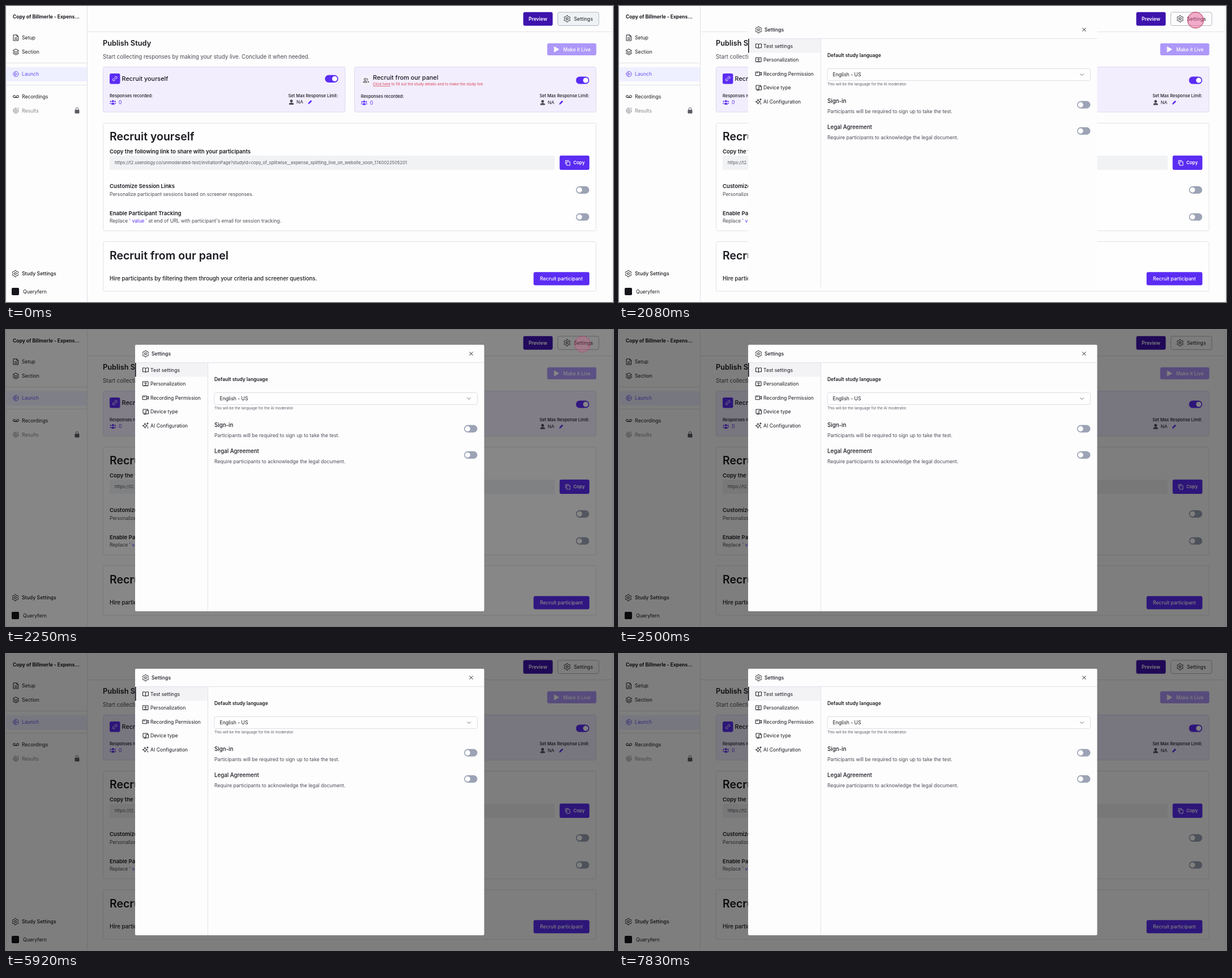
Recreate the animation shown at these times as an HTML page. Size 1072x522 px, loop 8000 ms.

```html
<!DOCTYPE html>
<html lang="en">
<head>
<meta charset="utf-8">
<title>Publish study</title>
<style>
html, body { margin: 0; width: 100%; height: 100%; overflow: hidden; background: #fdfdfd }
svg { display: block; font-family: Inter, "Open Sans", sans-serif }
.icon { fill: none; stroke-width: 1; stroke-linecap: round; stroke-linejoin: round }
</style>
</head>
<body>
<svg id="stage" width="1072" height="522" viewBox="0 0 1072 522"></svg>
<script>
const INK = '#1a1a20', GREY = '#4a4a54', VIOLET = '#5b2cf3', LINE = '#e1e2e8';

// y is the middle of the capitals
const text = (x, y, size, str, fill = INK, weight = 400) =>
  `<text x="${x}" y="${(y + size * .36).toFixed(2)}" font-size="${size}" font-weight="${weight}" fill="${fill}">${str}</text>`;
const rect = (x, y, w, h, fill, r = 0, stroke = 'none') =>
  `<rect x="${x}" y="${y}" width="${w}" height="${h}" rx="${r}" fill="${fill}" stroke="${stroke}"/>`;
const line = (d, stroke = LINE) => `<path d="${d}" fill="none" stroke="${stroke}"/>`;
const circle = (x, y, r, fill) => `<circle cx="${x}" cy="${y}" r="${r}" fill="${fill}"/>`;
const ring = r => `M${-r} 0a${r} ${r} 0 1 0 ${2 * r} 0a${r} ${r} 0 1 0 ${-2 * r} 0`;
// icon paths are drawn around their own centre
const icon = (x, y, d, color = INK, fill = 'none') =>
  `<path class="icon" transform="translate(${x} ${y})" d="${d}" stroke="${color}" style="fill:${fill}"/>`;

function gear(x, y) {
  let d = '';
  for (let i = 0; i < 48; i++) {
    const a = i * Math.PI / 24, r = 5 + .75 * Math.tanh(3 * Math.cos(6 * a));
    d += `${i ? 'L' : 'M'}${(r * Math.sin(a)).toFixed(2)} ${(r * Math.cos(a)).toFixed(2)}`;
  }
  return icon(x, y, d + 'Z' + ring(1.9));
}

const toggle = (x, y, on) =>
  rect(x - 11.7, y - 6.6, 23.4, 13.2, on ? VIOLET : '#9ca3b5', 6.6) + circle(x + (on ? 5.5 : -5.5), y, 4.6, '#fff');

const PLAY = 'M-1.4 -2.3L2.2 0L-1.4 2.3Z';
const PEOPLE = 'M-1.5 -2a1.5 1.5 0 1 0 3 0a1.5 1.5 0 1 0 -3 0M-2.5 3.2V2.2Q0 .2 2.5 2.2V3.2Z' +
  'M-4.6 -1.4a.8 .8 0 1 0 1.6 0a.8 .8 0 1 0 -1.6 0M3 -1.4a.8 .8 0 1 0 1.6 0a.8 .8 0 1 0 -1.6 0M-5 2.4V1.5H-3.8M5 2.4V1.5H3.8';
const USER = 'M-2 -2a2 2 0 1 0 4 0a2 2 0 1 0 -4 0M-3.6 3.6V2.4Q0 .4 3.6 2.4V3.6Z';
const USERS = 'M-3.6 -1.8a1.8 1.8 0 1 0 3.6 0a1.8 1.8 0 1 0 -3.6 0M-5 3.4Q-4.8 1.4 -1.8 1.4T1.4 3.4ZM1.6 -3.5a1.8 1.8 0 0 1 0 3.4M3 1.5Q4.6 2 4.8 3.4H3.4';
const LINK = 'M-1.2 1.2L1.2 -1.2M-.4 -2.2L1 -3.6A1.9 1.9 0 0 1 3.6 -1L2.2 .4M.4 2.2L-1 3.6A1.9 1.9 0 0 1 -3.6 1L-2.2 -.4';
const PENCIL = 'M-3 3L-2.4 1L1.4 -2.8L2.8 -1.4L-1 2.4Z';

function counters(x, y) {
  return text(x, y, 7.5, 'Responses recorded:', INK, 500) +
    icon(x + 5.8, y + 11.5, PEOPLE, VIOLET, VIOLET) + text(x + 16, y + 11.5, 8.7, '0', VIOLET) +
    text(x + 315.5, y - .3, 7.5, 'Set Max Response Limit:', INK, 500) +
    icon(x + 321, y + 11.2, USER, '#44444c', '#44444c') + text(x + 330, y + 10.8, 8.2, 'NA') +
    icon(x + 354, y + 11, PENCIL, VIOLET, VIOLET);
}

const sidebar =
  line('M143.5 0V522M0 100.5H143M0 139.5H143') + line('M.5 0V522M1070.5 0V522', '#ececf0') +
  text(12, 19, 8.5, 'Copy of Billmerle - Expens...', INK, 700) +
  icon(17.5, 56, 'M-4 -5H1.5L4 -2.5V5H-4ZM1.5 -5V-2.5H4M-2 0H2M-2 2.5H2') + text(28, 56, 8.7, 'Setup') +
  icon(17.5, 81, 'M0 -5L5 -2.4L0 .2L-5 -2.4ZM-5 .2L0 2.8L5 .2M-5 2.6L0 5.2L5 2.6') + text(28, 81, 8.7, 'Section') +
  rect(0, 108, 143, 25, '#eeefff') +
  icon(17.5, 120, ring(4.6) + PLAY, '#6d4df2') + text(28, 120, 8.7, 'Launch', '#6d4df2') +
  icon(17.5, 159.5, 'M-5 0a2 2 0 1 0 4 0a2 2 0 1 0 -4 0M1 0a2 2 0 1 0 4 0a2 2 0 1 0 -4 0M-3 2H3') +
  text(28, 159.5, 8.7, 'Recordings') +
  icon(17.5, 184.5, 'M4.4 -1A4.5 4.5 0 1 1 1 -4.4M2 .2A2.1 2.1 0 1 1 -.2 -2M0 0L4.6 -4.6', '#77777f') +
  text(28, 184.5, 8.7, 'Results', '#85858d') +
  rect(121.5, 183, 8, 6.5, '#5c5c64', 1) + line('M123.3 183V181.5A2.2 2.2 0 0 1 127.7 181.5V183', '#5c5c64') +
  gear(16.5, 472) + text(28, 471.5, 8.7, 'Study Settings', INK, 500) +
  rect(10, 497, 13, 13, '#16161a', 2) + text(30, 503.5, 8.7, 'Queryfern');

const header =
  line('M143 45.5H1070') +
  rect(913.5, 10.8, 52, 24, '#3e13ad', 3) + text(923, 22.5, 8.5, 'Preview', '#fff', 600) +
  `<rect id="settings" x="974.5" y="11" width="72.5" height="23.5" rx="3" stroke="#b4b8c0"/>` +
  gear(991, 22.5) + text(1003, 22.5, 8.7, 'Settings') +
  text(171, 65, 12.8, 'Publish Study', INK, 600) +
  text(171, 89.5, 9.73, 'Start collecting responses by making your study live. Conclude it when needed.', GREY) +
  rect(955.8, 65.8, 86.7, 21.2, '#ad98f9', 3) + icon(972, 76.5, 'M-3.5 -4.5L4.5 0L-3.5 4.5Z', '#fff', '#fff') +
  text(984, 76.5, 8.5, 'Make it Live', '#fff', 500);

const cards =
  rect(171.5, 107.5, 427.5, 79.5, '#f2eefe', 3, '#dcd8ef') + rect(615.5, 107.5, 426.5, 79.5, '#f2eefe', 3, '#dcd8ef') +
  rect(183, 119, 18.5, 18.5, VIOLET, 3) + icon(192.2, 128.2, LINK, '#fff') +
  text(204.5, 128.3, 10.85, 'Recruit yourself', INK, 500) + toggle(575, 128.3, true) + counters(183, 158.3) +
  rect(627, 122, 18, 18, '#f4f2f8', 3) + icon(636, 131, USERS, '#3c3c44') +
  text(648, 126, 10.85, 'Recruit from our panel', INK, 500) +
  text(648, 138, 6.52, '<tspan text-decoration="underline">Click here</tspan> to fill out the study details and to make the study live', '#dc3f4d') +
  toggle(1018.3, 131, true) + counters(626.7, 159);

const recruit =
  rect(171.5, 206.5, 870.5, 190, '#fefefe', 3, LINE) +
  text(183, 230, 19.5, 'Recruit yourself', INK, 600) +
  text(183, 257, 9.6, 'Copy the following link to share with your participants', INK, 600) +
  rect(183, 264, 786, 25, '#f1f2f4', 2) +
  text(192, 276, 7.7, 'https://t2.userology.co/unmoderated-test/invitationPage?studyId=copy_of_splitwise__expense_splitting_live_on_website_soon_1740022505201', '#55555e') +
  rect(977.7, 263.7, 52.6, 25.3, VIOLET, 3) +
  icon(992, 276.5, 'M-1.5 -1.8H4V4.5H-1.5ZM-3.8 2V-4H1.8', '#fff') + text(1002, 276.5, 7.9, 'Copy', '#fff', 600) +
  text(183, 317.5, 9.55, 'Customize Session Links', INK, 600) +
  text(183, 331.5, 8.53, 'Personalize participant sessions based on screener responses.', GREY) + toggle(1018.3, 324.3) +
  text(183, 365.5, 9.55, 'Enable Participant Tracking', INK, 600) +
  text(183, 379, 8.53, `Replace <tspan fill="${VIOLET}">' value '</tspan> at end of URL with participant's email for session tracking.`, GREY) +
  toggle(1018.3, 372);

const panel =
  rect(171.5, 415.5, 870.5, 87.5, '#fefefe', 3, LINE) +
  text(183, 439.5, 19.5, 'Recruit from our panel', INK, 600) +
  text(183, 480.5, 9.7, 'Hire participants by filtering them through your criteria and screener questions.', INK, 500) +
  rect(931.7, 469.3, 98.6, 23.3, VIOLET, 3) + text(943, 481, 8.6, 'Recruit participant', '#fff', 500);

const tabs = [
  ['Test settings', 'M0 -3V4M0 -3Q-2 -4.4 -5 -3.6V3.2Q-2 2.6 0 4Q2 2.6 5 3.2V-3.6Q2 -4.4 0 -3'],
  ['Personalization', 'M-4.5 -4H4.5V3.5H-4.5ZM-1.3 -1a1.3 1.3 0 1 0 2.6 0a1.3 1.3 0 1 0 -2.6 0M-2.5 3.4Q0 -.2 2.5 3.4'],
  ['Recording Permission', 'M-5 -3.2H2V3.2H-5ZM2 -.8L5 -2.6V2.6L2 .8M-3.4 -1.4H-1.8'],
  ['Device type', 'M1 3H-4.5V-4H4V-2M1 -2H5V4H1ZM-3 4.6H0'],
  ['AI Configuration', 'M-1 -4L.2 -.9L3.3 .3L.2 1.5L-1 4.6L-2.2 1.5L-5.3 .3L-2.2 -.9ZM3.4 -5V-2.2M2 -3.6H4.8M4 2.6V4.6'],
];

const option = (y, name, note) =>
  text(368, y, 9.7, name, INK, 500) + text(368, y + 18, 8.62, note, GREY) + toggle(820.7, y + 6.5);

const modal =
  rect(228, 26, 616.5, 470, '#fdfdfe', 2) +
  gear(246.5, 42) + text(257, 42, 8.7, 'Settings', INK, 500) +
  icon(821.5, 41.7, 'M-2.8 -2.8L2.8 2.8M2.8 -2.8L-2.8 2.8') +
  rect(228, 58, 128, 24.5, '#f3f3f6') + rect(228, 58, 1.6, 24.5, INK) +
  line('M228 57.5H844M356.5 58V496') +
  tabs.map(([name, d], i) => icon(246.5, 70.5 + i * 24.5, d) + text(255, 70.5 + i * 24.5, 8.65, name)).join('') +
  text(368, 86.5, 8.45, 'Default study language', INK, 600) +
  rect(368, 110.5, 464.5, 21, '#fefefe', 3, '#dcdee5') + text(377.5, 121, 8.6, 'English - US') +
  icon(817.5, 121, 'M-2.8 -1.3L0 1.5L2.8 -1.3', '#6a6a74') +
  text(368, 138, 6.47, 'This will be the language for the AI moderator.', '#5c5c66') +
  option(167.7, 'Sign-in', 'Participants will be required to sign up to take the test.') +
  option(213.8, 'Legal Agreement', 'Require participants to acknowledge the legal document.');

const byId = id => document.getElementById(id);
byId('stage').innerHTML = rect(0, 0, 1072, 522, '#fdfdfd') +
  sidebar + header + cards + recruit + panel +
  '<rect id="shade" width="1072" height="522"/>' +
  '<circle id="click" cx="1018.3" cy="25" r="14.2" fill="#e85a94" fill-opacity=".5" stroke="#b3365c"/>' +
  `<g id="modal">${modal}</g>`;

const LOOP = 8000, FPS = 12, PRESS = 24;
const SHADE = [0, 0, .19, .47, .5];
const CLICK = [.6, 1, 1, .55, .25, .1, 0];
const at = (list, i) => i < 0 ? 0 : list[Math.min(i, list.length - 1)];

function draw(now) {
  const step = Math.floor(now % LOOP * FPS / 1000 + .05) - PRESS;
  byId('settings').setAttribute('fill', step < 0 ? '#eff2f5' : '#fcfcfd');
  byId('shade').setAttribute('opacity', at(SHADE, step));
  byId('click').setAttribute('opacity', at(CLICK, step));
  byId('modal').setAttribute('visibility', step > 0 ? 'visible' : 'hidden');
}

const start = performance.now();
function tick() {
  draw(performance.now() - start);
  requestAnimationFrame(tick);
}
tick();
</script>
</body>
</html>
```
